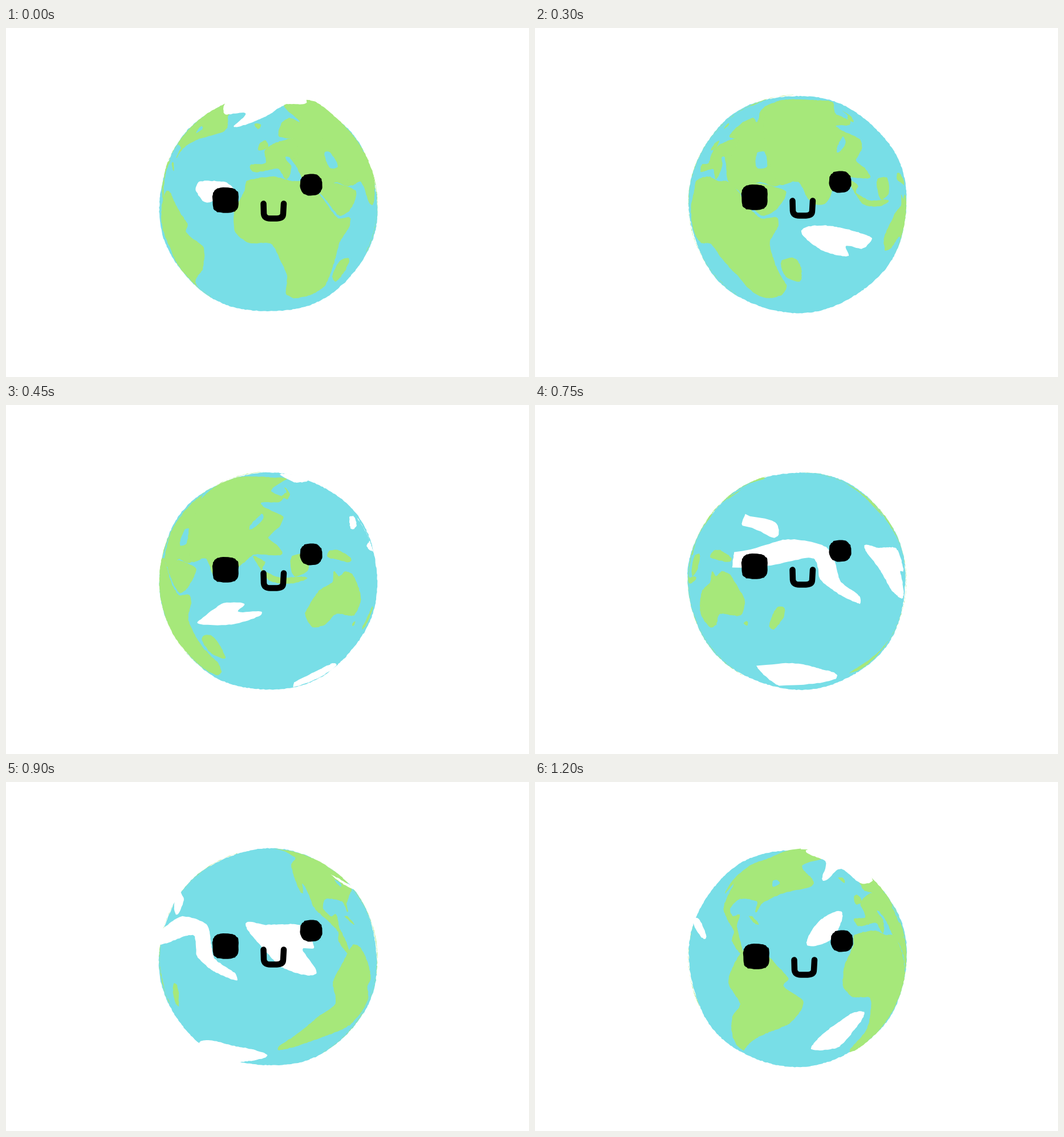
Recreate the animation shown at these times as an HTML page with a canvas. Size 917 px wide and 611 px high, loop 1350 ms.

```html
<!DOCTYPE html>
<html lang="en">
<head>
<meta charset="utf-8">
<title>Turning globe</title>
<style>
html, body { margin: 0; width: 100%; height: 100%; overflow: hidden; background: #fff; }
canvas { display: block; width: 917px; height: 611px; }
</style>
</head>
<body>
<canvas id="stage" width="917" height="611"></canvas>
<script>
const ctx = document.getElementById('stage').getContext('2d');
const SEA = '#78dee7', LAND = '#a6e87a', CLOUD = '#fff', INK = '#000';
const STEP = 150, CX = 460, CY = 308, R = 191, TAU = Math.PI * 2;

// Facing longitude and height of the face for each pose.
const facing = [0, 30, 60, 96, 132, 185, 238, 273, 316];
const faceY = [0, -1, -5, -13, -23, -19, -14, -6, 4];

let seed = 7;
const random = () => (seed = (seed * 16807) % 2147483647) / 2147483647;
const jitter = () => (random() - 0.5) * 1.1;
const clamp = (v, m) => Math.max(-m, Math.min(m, v));
const wrap = deg => ((deg + 540) % 360 + 360) % 360 - 180;
const width = y => R * Math.sqrt(Math.max(0.002, 1 - ((y - CY) / R) ** 2));

// Closed soft curve through the points, sampled every few pixels.
function sample(text) {
  const p = text.split(' ').map(s => s.split(',').map(Number)), n = p.length, out = [];
  for (let i = 0; i < n; i++) {
    const [a, b, c, d] = [n - 1, 0, 1, 2].map(k => p[(i + k) % n]);
    const len = Math.hypot(c[0] - b[0], c[1] - b[1]);
    const count = Math.max(2, Math.round(len / 3));
    const tan = (from, to, k) =>
      (to[k] - from[k]) / (Math.hypot(to[0] - from[0], to[1] - from[1]) || 1) * len * 0.65;
    for (let j = 0; j < count; j++) {
      const t = j / count, t2 = t * t, t3 = t2 * t;
      out.push([0, 1].map(k => b[k] * (2 * t3 - 3 * t2 + 1) + c[k] * (3 * t2 - 2 * t3)
        + tan(a, c, k) * (t3 - 2 * t2 + t) + tan(b, d, k) * (t3 - t2)));
    }
  }
  return out;
}

function trace(points) {
  const path = new Path2D();
  for (const [x, y] of points) path.lineTo(x + jitter(), y + jitter());
  path.closePath();
  return path;
}

// A patch is drawn as seen from one facing and can be turned to any other.
function patch(home, text) {
  const flat = sample(text);
  const globe = flat.map(([x, y]) => [Math.asin(clamp((x - CX) / width(y), 1)) * 360 / TAU, y]);
  const mid = globe.reduce((sum, p) => sum + p[0], 0) / globe.length;
  return view => {
    if (view === home) return trace(flat);
    const shift = wrap(mid + home - view) - mid;
    return trace(globe.map(([lon, y]) =>
      [CX + width(y) * Math.sin(clamp(lon + shift, 90) * TAU / 360), y]));
  };
}

const lands = [], waters = [], clouds = facing.map(() => []);
const land = (home, text) => lands.push(patch(home, text));
const water = (home, text) => waters.push(patch(home, text));
const cloud = (i, text) => clouds[i].push(patch(facing[i], text));

// Africa, Arabia, Madagascar
land(0, '422,268 470,260 500,268 520,268 545,285 582,333 603,332 602,348 585,375 577,405 560,450 535,467 505,473 491,465 493,435 478,400 465,378 425,376 402,357 400,322 418,285');
land(0, '545,278 580,272 613,285 613,298 602,320 585,329 563,303');
land(0, '572,435 585,408 601,403 596,422 578,444');
// Europe and western Asia
land(0, '488,134 540,128 592,170 631,224 646,285 641,310 628,280 620,267 600,277 578,270 550,285 522,268 508,240 498,226 508,212 500,195 478,189 483,167 497,157 515,164');
land(0, '428,240 455,236 453,215 466,204 485,197 508,195 510,228 490,226 500,242 492,265 478,247 455,250 433,252');
land(0, '444,203 455,197 460,209 443,214');
land(0, '436,168 447,169 442,177');
water(0, '558,218 568,217 582,243 568,245');
// Eastern Asia and its islands
land(60, '425,128 505,127 522,130 527,150 552,162 552,170 528,172 570,195 573,212 563,232 578,245 587,262 548,262 525,283 511,282 511,303 495,304 474,272 453,269 430,275 415,250 400,165');
land(60, '600,265 617,262 620,290 606,300');
land(132, '330,265 345,275 340,288 365,302 410,302 385,312 350,308');
land(132, '408,161 424,152 428,144 427,155 415,165');
water(132, '336,217 363,190 360,200');
// Oceania
land(132, '452,265 460,255 478,254 508,272 470,270');
land(132, '412,365 433,325 460,310 464,291 475,300 490,291 510,298 535,340 522,368 475,366 455,385 432,389');
land(132, '522,382 531,379 527,387');
land(132, '563,388 585,353 593,355 588,372 568,393');
// Americas
land(273, '468,117 500,122 538,135 535,146 575,180 545,195 520,212 514,228 510,210 470,205 458,222 470,235 484,232 484,252 502,300 478,278 480,262 440,220 437,178 427,195 427,170 440,145 465,132');
land(273, '503,235 510,235 525,250');
land(273, '498,300 515,285 535,290 576,343 567,357 587,382 577,402 550,425 485,447 418,470 412,462 455,410 483,388 468,350');
water(273, '517,172 530,177 524,184');

cloud(0, '383,150 388,125 450,112 524,118 526,132 490,134 455,155 400,173 420,150');
cloud(0, '333,285 338,269 385,270 398,282 352,306');
cloud(2, '467,355 513,346 590,367 575,386 545,382 550,399 505,390');
cloud(4, '453,122 505,122 500,132 457,135');
cloud(4, '527,216 540,196 562,197 550,212');
cloud(4, '568,248 598,235 600,207 620,196 648,242 600,256');
cloud(4, '286,382 295,348 319,348 314,362 344,364 312,384');
cloud(4, '466,486 490,465 520,452 545,456 553,468 520,494');
cloud(6, '262,282 328,268 335,305 362,330 405,348 402,335 365,308 352,250 305,236');
cloud(6, '420,248 455,250 520,252 540,290 520,292 543,336 485,325 450,290');
cloud(6, '340,455 400,462 458,478 430,488 370,490');
cloud(6, '298,232 300,190 312,205');
cloud(6, '570,162 620,192 590,178');
cloud(7, '276,238 345,213 373,240 405,290 432,310 375,320 352,303 320,262');
cloud(7, '593,250 606,240 610,202 626,205 645,242 632,270 622,263');
cloud(7, '347,446 405,465 430,490 375,490');
cloud(7, '540,458 572,433 600,434 575,472');
cloud(8, '475,122 495,112 560,125 592,172 572,178 535,152 505,173 510,140');
cloud(8, '477,285 500,242 538,228 520,275');
cloud(8, '484,465 555,405 578,404 555,440 530,465');
cloud(8, '275,240 288,240 298,275');
// Poses without clouds of their own borrow from their neighbours.
clouds[1] = [...clouds[0], ...clouds[2]];
clouds[3] = clouds[4];
clouds[5] = clouds[6];

// Rounded blob; a higher power makes it squarer.
function blob(x, y, rx, ry, power, wobble = () => 1) {
  const pts = [], count = Math.round(rx * 2);
  const bend = v => Math.sign(v) * Math.abs(v) ** (2 / power);
  for (let i = 0; i < count; i++) {
    const a = i / count * TAU, w = wobble(a);
    pts.push([x + rx * w * bend(Math.cos(a)), y + ry * w * bend(Math.sin(a))]);
  }
  return trace(pts);
}

const poses = facing.map((view, i) => ({
  sea: [blob(CX, CY, R, 190, 2.04, a => 1 + 0.006 * (Math.sin(3 * a + i) + Math.sin(7 * a + 2 * i)))],
  land: lands.map(f => f(view)),
  water: waters.map(f => f(view)),
  cloud: clouds[i].map(f => f(view))
}));

const eyes = [blob(385, 301.5, 23, 22, 3.3), blob(535, 274.5, 19.5, 19, 2.5)];
const mouth = new Path2D('M451.5 307.5 L452 325 Q453 333.5 463 333.5 H475 Q486 333 486 325 L487 307.5');

function paint(paths, color) {
  ctx.fillStyle = color;
  for (const p of paths) ctx.fill(p);
}

function draw(i) {
  const pose = poses[i];
  ctx.fillStyle = '#fff';
  ctx.fillRect(0, 0, 917, 611);
  paint(pose.sea, SEA);
  paint(pose.land, LAND);
  paint(pose.water, SEA);
  paint(pose.cloud, CLOUD);
  ctx.save();
  ctx.translate(i === 8 ? 3 : 0, faceY[i]);
  paint(eyes, INK);
  ctx.lineWidth = 10.5;
  ctx.lineCap = 'round';
  ctx.strokeStyle = INK;
  ctx.stroke(mouth);
  ctx.restore();
}

const start = performance.now();
function tick(now) {
  draw(Math.floor(Math.max(0, now - start) / STEP) % poses.length);
  requestAnimationFrame(tick);
}
draw(0);
requestAnimationFrame(tick);
</script>
</body>
</html>
```
